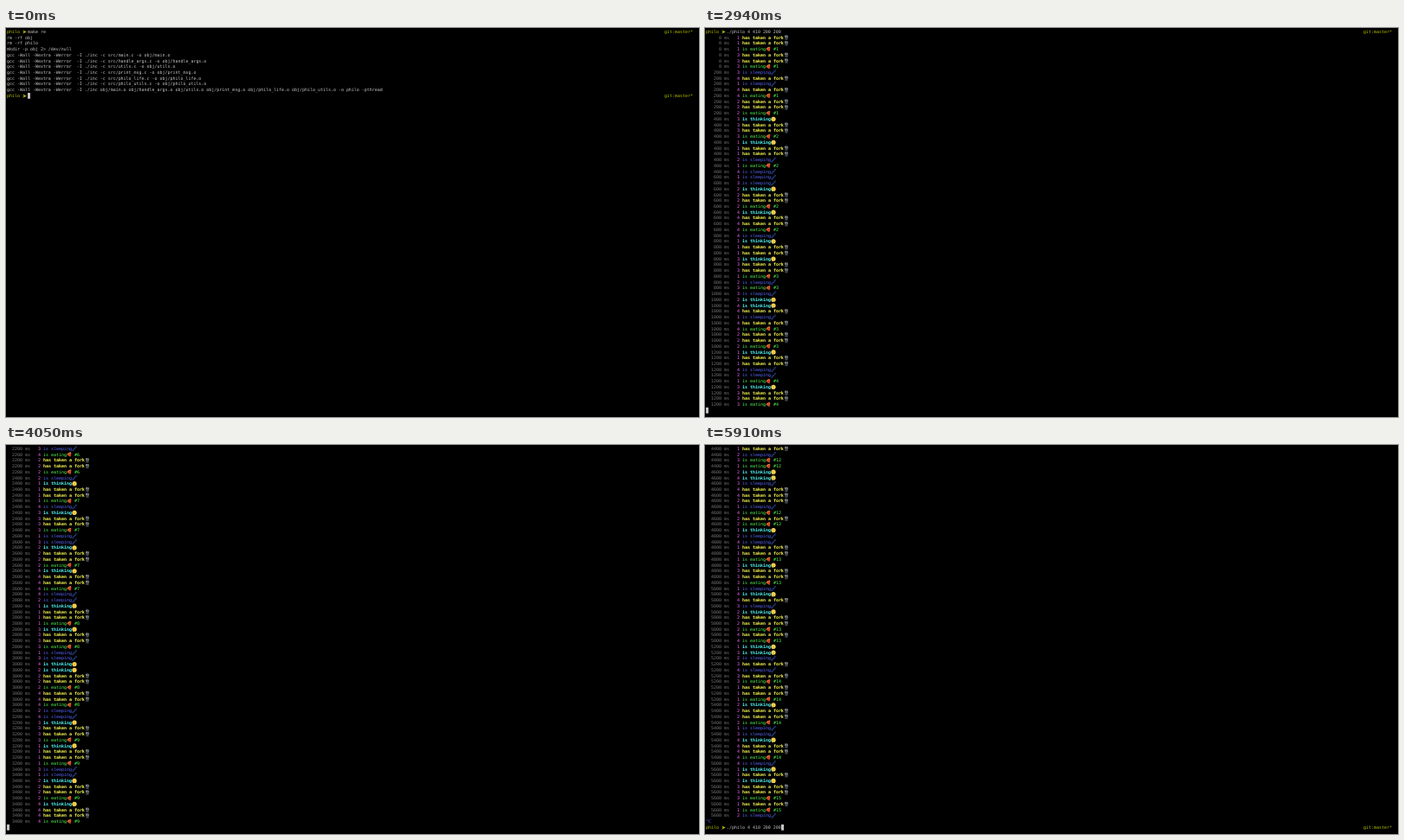
An HTML page that plays this animation: 800 px wide and 450 px high, repeating every 5940 ms.

```html
<!DOCTYPE html>
<html lang="en">
<head>
<meta charset="utf-8">
<title>philo</title>
<style>
  html, body { margin: 0; width: 100%; height: 100%; overflow: hidden; background: #000; }
  svg { display: block; }
  text {
    font: 4.983px "DejaVu Sans Mono", "Liberation Mono", monospace;
    white-space: pre;
    fill: #c4c4c4;
  }
  .prompt { fill: #b8c000; }
  .dim { fill: #777; }
  .f, .t { font-weight: bold; }
  .id { fill: #ff66ff; }
  .f { fill: #ffff55; }
  .e { fill: #55ff55; }
  .s { fill: #5c68ff; }
  .t { fill: #55ffff; }
</style>
</head>
<body>
<svg id="term" width="800" height="450" viewBox="0 0 800 450">
  <defs>
    <g id="icon-f" fill="none" stroke="#9aa4ae" stroke-width=".7">
      <path d="M1.4 .9v1.6q0 .6.6.6t.6-.6V.9M2 .9v5.2"/>
      <path d="M3.8 6.1V.9q.7.6.6 2.4h-.6"/>
    </g>
    <g id="icon-e">
      <path d="M.5 3.6Q1.2 1.2 4.6.7L5.4 1.6 4.4 6.1Z" fill="#e5582c"/>
      <path d="M.5 3.6Q1.2 1.2 4.6.7L4.9 1.3Q2 1.8 1.1 4Z" fill="#c98a3c"/>
      <circle cx="2.5" cy="3.3" r=".6" fill="#c8281c"/>
      <circle cx="4" cy="2.6" r=".6" fill="#c8281c"/>
      <circle cx="3.8" cy="4.5" r=".5" fill="#c8281c"/>
    </g>
    <g id="icon-s" fill="none" stroke="#3f6fe0" stroke-width=".5">
      <path d="M.6 4.1h1.7L.6 5.8h1.7M2.6 2.5h1.3L2.6 3.9h1.3M4.2.8h1.3L4.2 2.1h1.3"/>
    </g>
    <g id="icon-t">
      <circle cx="3" cy="3.3" r="2.6" fill="#ffdb55"/>
      <path d="M1.6 2.5h.8M3.6 2.3h.8" stroke="#8a5a1a" stroke-width=".5"/>
      <path d="M2.4 4.2 4 4" stroke="#8a5a1a" stroke-width=".4"/>
      <path d="M.9 4.8 2.7 4.5 2.6 5.8 1.4 6Z" fill="#f0a935"/>
    </g>
    <path id="arrow" class="prompt" d="M.3 1.5 4.8 3.6.3 5.7 1.6 3.6Z"/>
  </defs>
  <g id="scroll"><rect id="cursor" width="3" height="6.74" fill="#c4c4c4"/></g>
</svg>
<script>
const NS = 'http://www.w3.org/2000/svg';
const LOOP = 5940, FRAME = 30;
const COL = 3, LINE = 6.74, LEFT = 1, TOP = 0.9, BASE = 4.9, ROWS = 66;
const ARROW_COL = 6, PROMPT_COL = 8, GIT_COL = 253;
const START = 2310, STOP = 5220;

const RUN = './philo 4 410 200 200';
const SUGGESTION = RUN + ' 5';
const TYPING = [
  [0, ''], [270, '.'], [360, './'], [510, './philo'], [570, './philo '],
  [1620, SUGGESTION], [2070, RUN + ' '], [2160, RUN]
];
const RECALL = [[0, ''], [5550, RUN]];

const GCC = 'gcc -Wall -Wextra -Werror  -I ./inc ';
const UNITS = ['main', 'handle_args', 'utils', 'print_msg', 'philo_life', 'philo_utils'];
const BUILD = [
  'rm -rf obj', 'rm -rf philo', 'mkdir -p obj 2> /dev/null',
  ...UNITS.map(u => `${GCC}-c src/${u}.c -o obj/${u}.o`),
  GCC + UNITS.map(u => `obj/${u}.o`).join(' ') + ' -o philo -pthread'
];

// One word per 200 ms of simulation: philosopher number + action
const EVENTS = `
  1f1f1e3f3f3e 3s4f1s4f4e2f2f2e 3t3f3f3e1t1f1f2s1e4s 1s3s2t2f2f2e4t4f4f4e
  4s1t1f1f3t3f3f1e2s3e 3s2t4t4f1s4f4e2f2f2e 1t1f1f4s2s1e3t3f3f3e 2t2f2f2e3s1s4t4f4f4e
  2s1t1f1f1e3t3f3f3e4s 4t4f1s2t2f2f2e3s4f4e 2s3t3f3f3e4s1t1f1f1e 2t4t4f4f1s3s4e2f2f2e
  2s1t1f1f1e4s3t3f3f3e 1s3s2t2f2f2e4t4f4f4e 4s2s1t1f1f1e3t3f3f3e 1s3s4t2t2f2f2e4f4f4e
  2s4s3t3f3f3e1t1f1f1e 3s1s2t2f2f2e4t4f4f4e 3t4s1t1f1f1e3f3f3e2s 2t3s1s4t4f4f4e2f2f2e
  4s3t3f2s1t1f1f1e3f3e 1s3s2t2f2f2e4t4f4f4e 3t3f3f4s1t1f1f2s3e1e 2t4t3s4f4f2f1s4e2f2e
  1t2s4s1f1f1e3t3f3f3e 1s4t4f3s2t2f2f2e4f4e 1t3t2s3f4s3f3e1f1f1e 2t2f2f2e1s3s4t4f4f4e
  4s1t1f3t3f3f3e1f1e2s`.trim().split(/\s+/);
const ACTIONS = { f: 'has taken a fork', e: 'is eating', s: 'is sleeping', t: 'is thinking' };

const scroll = document.getElementById('scroll');
const cursor = document.getElementById('cursor');
const rows = [];

function add(parent, tag, attrs, content = '') {
  const el = document.createElementNS(NS, tag);
  for (const key in attrs) el.setAttribute(key, attrs[key]);
  el.textContent = content;
  return parent.appendChild(el);
}

const write = (row, col, content, cls = '') =>
  add(row, 'text', { x: LEFT + col * COL, y: BASE, class: cls }, content);

const place = (row, col, id) =>
  add(row, 'use', { href: '#' + id, x: LEFT + col * COL });

function addRow(at) {
  const y = TOP + rows.length * LINE;
  const el = add(scroll, 'g', { transform: `translate(0 ${y})` });
  rows.push({ at, el });
  return el;
}

function addPrompt(at, command) {
  const row = addRow(at);
  write(row, 0, 'philo', 'prompt');
  place(row, ARROW_COL, 'arrow');
  write(row, GIT_COL, 'git:master*', 'prompt');
  return {
    typed: write(row, PROMPT_COL, command),
    ghost: write(row, PROMPT_COL, '', 'dim')
  };
}

function addEvent(at, ms, id, action, meals) {
  const row = addRow(at), label = ACTIONS[action], end = 14 + label.length;
  write(row, 2, String(ms).padStart(4) + ' ms', 'dim');
  write(row, 12, id, 'id');
  write(row, 14, label, action);
  place(row, end, 'icon-' + action);
  if (meals) write(row, end + 3, '#' + meals, action);
}

function build() {
  addPrompt(0, 'make re');
  BUILD.forEach(line => write(addRow(0), 0, line));
  const first = addPrompt(0, '');
  const meals = {};
  EVENTS.forEach((word, k) => {
    const at = 2285 + 100 * k + (k % 11 ? 0 : 25);
    for (const [, id, action] of word.matchAll(/(\d)(\w)/g)) {
      if (action === 'e') meals[id] = (meals[id] || 0) + 1;
      addEvent(at, k * 200, id, action, action === 'e' && meals[id]);
    }
  });
  write(addRow(STOP), 0, '^C', 's');
  return [first, addPrompt(STOP, '')];
}

const [first, last] = build();
const textAt = (steps, t) => steps.filter(s => s[0] <= t).pop()[1];

function draw(t) {
  const running = t >= START && t < STOP;
  const shown = rows.filter(r => r.at <= t).length;
  const line = running ? shown : shown - 1;
  const top = Math.max(0, line - ROWS + 1);
  rows.forEach((r, i) => { r.el.style.display = i >= top && i < shown ? '' : 'none'; });

  const typed = textAt(TYPING, t), recalled = textAt(RECALL, t);
  const hint = t >= 270 && t < 1620 ? SUGGESTION.slice(typed.length) : '';
  first.typed.textContent = typed;
  first.ghost.textContent = hint;
  first.ghost.setAttribute('x', LEFT + (PROMPT_COL + typed.length) * COL);
  last.typed.textContent = recalled;

  const col = running ? 0 : PROMPT_COL + (t < START ? typed : recalled).length;
  cursor.setAttribute('x', LEFT + col * COL);
  cursor.setAttribute('y', TOP + line * LINE);
  scroll.setAttribute('transform', `translate(0 ${-top * LINE})`);
}

const begin = performance.now();
let previous = -1;
function tick() {
  const elapsed = (performance.now() - begin) % LOOP;
  const t = Math.floor(elapsed / FRAME) * FRAME;
  if (t !== previous) draw(previous = t);
  requestAnimationFrame(tick);
}
tick();
</script>
</body>
</html>
```
